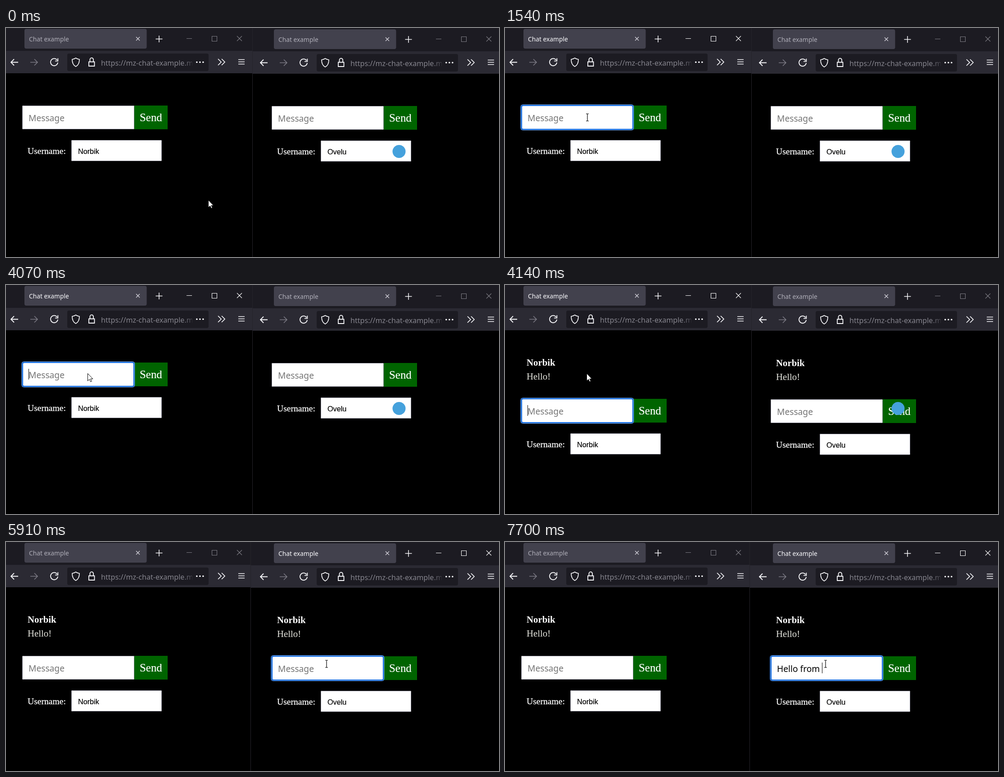
Recreate the animation shown at these times as an HTML page with a canvas. Size 1095 by 511 pixels, loop 8 s.

```html
<!DOCTYPE html>
<html lang="en">
<head>
<meta charset="utf-8">
<title>Chat example</title>
<style>
  html, body { margin: 0; width: 100%; height: 100%; overflow: hidden; background: #000; }
  canvas { display: block; }
</style>
</head>
<body>
<canvas id="stage" width="1095" height="511"></canvas>
<script>
const ctx = document.getElementById('stage').getContext('2d');
const LOOP = 8000, BLINK = 530, SENT = 4140, LEFT_FOCUS = 1010, RIGHT_FOCUS = 5380;
const MESSAGE_HEIGHT = 81;
const SANS = '"Noto Sans", sans-serif';
const ARIAL = '"Liberation Sans", sans-serif';
const SERIF = '"Liberation Serif", serif';

const panes = [
  { x: 0, y: 0, user: 'Norbik', message: 'Hello!', focus: LEFT_FOCUS, blur: RIGHT_FOCUS,
    keys: [1940, 2090, 2880, 2950, 3010, 3670], clear: 4070 },
  { x: 554, y: 1, user: 'Ovelu', message: 'Hello from ', focus: RIGHT_FOCUS, blur: LOOP,
    keys: [6110, 6440, 6560, 6680, 6800, 6910, 7230, 7320, 7420, 7510, 7610], clear: LOOP }
];

// Pointer hot spot moves between rests in short discrete steps.
const moves = [
  { start: 70, step: 74, count: 11, from: [449.5, 384], to: [181.5, 197.5] },
  { start: 4600, step: 70, count: 11, from: [181.5, 197.5], to: [710.5, 270] }
];

function rect(x, y, w, h, color, radius = 0) {
  ctx.fillStyle = color;
  ctx.beginPath();
  ctx.roundRect(x, y, w, h, radius);
  ctx.fill();
}

function frame(x, y, w, h, color, width, radius) {
  ctx.strokeStyle = color;
  ctx.lineWidth = width;
  ctx.beginPath();
  ctx.roundRect(x, y, w, h, radius);
  ctx.stroke();
}

function line(path, color, width = 1.5) {
  ctx.strokeStyle = color;
  ctx.lineWidth = width;
  ctx.stroke(new Path2D(path));
}

function text(value, x, y, font, color, heft = 0) {
  ctx.font = font;
  ctx.fillStyle = ctx.strokeStyle = color;
  ctx.fillText(value, x, y);
  if (heft) {
    ctx.lineWidth = heft;
    ctx.lineJoin = 'round';
    ctx.strokeText(value, x, y);
    ctx.lineJoin = 'miter';
  }
}

function drawChrome(active) {
  const light = '#fbfbfe', dim = '#7b7a84';
  const windowColor = active ? '#fff' : '#7d7c84';

  rect(-12, -1, 570, 52, '#1c1b22');
  rect(41, 2, 271.5, 44, '#42414d', 4);
  text('Chat example', 51, 30, '13.8px ' + SANS, active ? '#fbfbfe' : '#b0afb9');
  line('M289 20l8 8M297 20l-8 8', '#d8d7df', 1.3);
  line('M332.5 24.5h15M340 17v15', light);
  line('M401 23.5h12M457.5 18.5h11v11h-11zM513 18l11 11M524 18l-11 11', windowColor, 1.1);

  rect(-12, 51, 570, 50, '#2b2a33');
  line('M27 76.5H11M18 69.5l-7 7 7 7', light, 1.8);
  line('M54 76.5h16M63 69.5l7 7-7 7', dim, 1.7);
  line('M113.5 71.5A8 8 0 1 0 115 77M115.3 67.5v6.2h-6.2', light, 1.8);

  rect(136, 57, 314, 39, '#1c1b22', 4);
  line('M155 67c3 2 5 2.5 8 3 0 8-2 13-8 16-6-3-8-8-8-16 3-.5 5-1 8-3z', light, 1.7);
  line('M184 75.5h12.5v9.5H184zM186.5 75v-4.5a3.8 3.8 0 0 1 7.6 0V75', light, 1.8);

  const fade = ctx.createLinearGradient(392, 0, 414, 0);
  fade.addColorStop(0, '#85848d');
  fade.addColorStop(1, '#3a3941');
  ctx.save();
  ctx.beginPath();
  ctx.rect(205, 57, 208.5, 39);
  ctx.clip();
  text('https://mz-chat-example.m', 211, 83.5, '16.1px ' + SANS, fade);
  ctx.restore();

  for (const x of [422, 429, 436]) rect(x, 74.5, 3.6, 3.6, light, 1.8);
  line('M471 69l7 7-7 7M479 69l7 7-7 7', light, 1.7);
  line('M516 70.5h14M516 75.5h14M516 80.5h14', light, 1.3);
}

function drawPage(pane, t, active) {
  const typed = t < pane.clear
    ? pane.message.slice(0, pane.keys.filter(k => k <= t).length) : '';
  const lastInput = Math.max(...[pane.focus, ...pane.keys, pane.clear].filter(k => k <= t));

  ctx.save();
  if (t >= SENT) {
    text(panes[0].user, 48, 180, 'bold 20.8px ' + SERIF, '#fff');
    text(panes[0].message, 48, 211, '20.8px ' + SERIF, '#d6d6cf', .2);
    ctx.translate(0, MESSAGE_HEIGHT);
  }

  rect(285, 173, 74, 53, '#006400');
  text('Send', 297, 208, '24.9px ' + SERIF, '#fff', .2);
  rect(36, 173, 249, 53, '#fff', 2);
  if (active) {
    frame(34, 171, 252, 57, 'rgba(0, 96, 223, .35)', 2, 5);
    frame(35.5, 171.5, 250, 56, '#9cc2f3', 1, 4);
    frame(37, 173, 247, 53, '#0060df', 2, 3);
  } else {
    frame(36.5, 173.5, 248, 52, '#8f8f9d', 1, 2);
  }
  text(typed || 'Message', 50, 208, '19.2px ' + SANS, typed ? '#000' : '#757575');
  if (active && t - lastInput < BLINK) {
    const x = Math.round(50 + ctx.measureText(typed).width);
    rect(x, 187, 1, 24, '#000');
  }

  text('Username:', 48, 281, '19.6px ' + SERIF, '#fff', .3);
  rect(145, 250, 201, 47, '#fff', 2);
  frame(145.5, 250.5, 200, 46, '#8f8f9d', 1, 2);
  text(pane.user, 160, 280.5, '16.2px ' + ARIAL, '#000', .2);
  ctx.restore();
}

function drawPane(pane, t) {
  const active = t >= pane.focus && t < pane.blur;
  ctx.save();
  ctx.translate(pane.x, pane.y);
  drawChrome(active);
  drawPage(pane, t, active);
  ctx.restore();
}

function pointerAt(t) {
  const move = t < moves[1].start ? moves[0] : moves[1];
  const step = Math.floor((t - move.start) / move.step) + 1;
  const p = Math.min(Math.max(step / move.count, 0), 1);
  const eased = p * p * (3 - 2 * p);
  return move.from.map((v, i) => v + (move.to[i] - v) * eased);
}

function overInput(x, y, t) {
  if (t >= panes[0].clear && t < SENT) return false;
  const shift = t < SENT ? 0 : MESSAGE_HEIGHT;
  return panes.some(p => {
    const dx = x - p.x - 36, dy = y - p.y - 173 - shift;
    return dx > 0 && dx < 249 && dy > 0 && dy < 53;
  });
}

function drawPointer(t) {
  const [x, y] = pointerAt(t);
  ctx.save();
  ctx.translate(x, y);
  if (overInput(x, y, t)) {
    line('M-1.5-6h2.5l.5 1 .5-1h2.5M1.5-5.5v15M-1.5 10h2.5l.5-1 .5 1h2.5', '#000', 1.2);
  } else {
    const arrow = new Path2D('M0 0v16.5l3.8-3.6 2.6 5.6 2.5-1.2-2.5-5.3h5z');
    ctx.fillStyle = '#fff';
    ctx.fill(arrow);
    ctx.strokeStyle = '#000';
    ctx.lineWidth = 1;
    ctx.stroke(arrow);
  }
  ctx.restore();
}

function draw(t) {
  const divider = t < RIGHT_FOCUS ? 547 : 543;
  rect(0, 0, 1095, 511, '#000');
  drawPane(panes[0], t);
  ctx.save();
  ctx.beginPath();
  ctx.rect(divider, 0, 1095 - divider, 511);
  ctx.clip();
  rect(divider, 0, 1095 - divider, 511, '#000');
  drawPane(panes[1], t);
  rect(divider, 0, 1, 511, '#25242a');
  ctx.restore();
  if (t < RIGHT_FOCUS) rect(858.5, 261, 29, 29, '#45a1dc', 14.5);
  drawPointer(t);
}

const began = performance.now();
function tick() {
  draw((performance.now() - began) % LOOP);
  requestAnimationFrame(tick);
}
tick();
</script>
</body>
</html>
```
